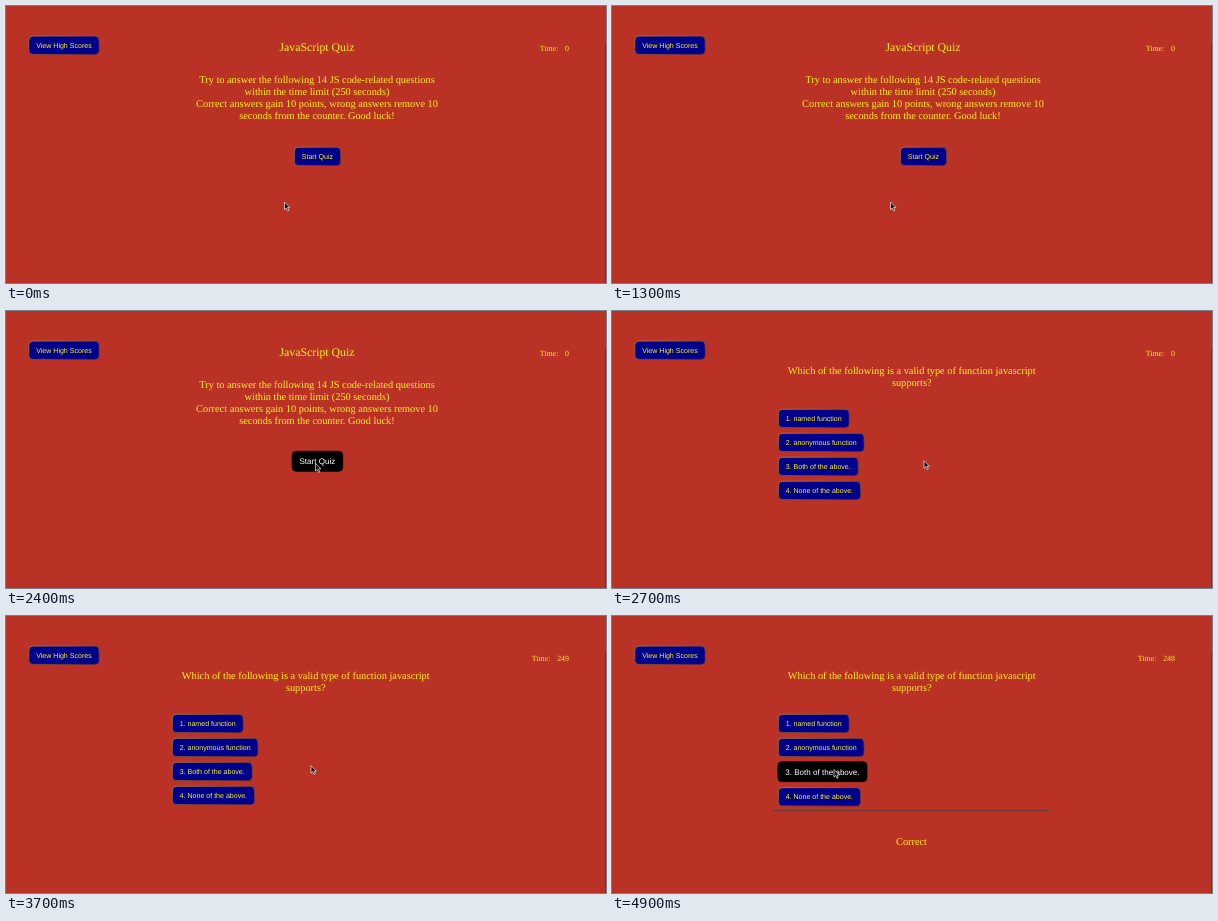
Animation, 600 px wide and 277 px high, one loop 5 s. Source, as an HTML page:

```html
<!DOCTYPE html>
<html lang="en">
<head>
<meta charset="utf-8">
<title>JavaScript Quiz</title>
<style>
  html, body { margin: 0; width: 100%; height: 100%; overflow: hidden; background: #ba3126; }
  svg { display: block; width: 600px; height: 277px; }
  text { fill: #fdf41e; text-rendering: geometricPrecision; }
  .serif { font: 10.34px "Liberation Serif", Times, serif; text-anchor: middle; }
  #title { font-size: 11.8px; }
  #time text { font-size: 7.9px; text-anchor: end; }
  .btn text { font: 7.05px "Liberation Sans", Arial, sans-serif; }
  .btn rect { fill: #00008b; stroke: url(#bevel); stroke-width: .8px; }
  .btn.hover text { font-size: 8.05px; fill: #fff; }
  .btn.hover rect { fill: #000; stroke: #000; }
</style>
</head>
<body>
<svg viewBox="0 0 600 277">
  <defs>
    <linearGradient id="bevel" x2="1" y2="1">
      <stop offset="0" stop-color="#b98a34"/>
      <stop offset="1" stop-color="#4a2436"/>
    </linearGradient>
  </defs>
  <rect width="600" height="277" fill="#ba3126"/>
  <rect x="599" y="37" width="1" height="240" fill="#8e261f"/>
  <g id="common"></g>
  <g id="time" class="serif">
    <text id="label" y="44.7">Time:</text>
    <text id="count" x="563" y="44.7"></text>
  </g>
  <g id="intro">
    <g class="serif">
      <text id="title" x="311" y="45">JavaScript Quiz</text>
      <text x="311" y="76.7">Try to answer the following 14 JS code-related questions</text>
      <text x="311" y="88.9">within the time limit (250 seconds)</text>
      <text x="311" y="101.1">Correct answers gain 10 points, wrong answers remove 10</text>
      <text x="311" y="113.3">seconds from the counter. Good luck!</text>
    </g>
  </g>
  <g id="quiz">
    <g class="serif">
      <text x="299.7" y="63">Which of the following is a valid type of function javascript</text>
      <text x="299.7" y="75.3">supports?</text>
    </g>
  </g>
  <g id="result" class="serif">
    <path d="M161 194.5H438" stroke="#693c38"/>
    <text x="299.5" y="229">Correct</text>
  </g>
  <path id="cursor" d="M0 0V7.6L1.7 6L3 8.9L4.3 8.3L3.1 5.5H5.4Z" fill="#111" stroke="#eee" stroke-width=".7" stroke-linejoin="round"/>
</svg>
<script>
const LOOP = 5000, STEP = 100;
const START = 2500, ANSWER = 4700;
const $ = id => document.getElementById(id);

// time, x, y of the pointer tip
const path = [
  [0, 278.5, 196], [1300, 278.5, 196], [1900, 277.3, 176.3],
  [2300, 309, 153], [2700, 312, 149.6], [3300, 311, 149.6],
  [3700, 305, 149.6], [4300, 221, 172.5], [4600, 222, 155],
  [4900, 222, 153.5], [5000, 222, 153.5]
];

function pointer(t) {
  const i = Math.max(1, path.findIndex(p => p[0] >= t));
  const [t0, x0, y0] = path[i - 1], [t1, x1, y1] = path[i];
  const k = (t - t0) / (t1 - t0), e = k * k * (3 - 2 * k);
  return [x0 + (x1 - x0) * e, y0 + (y1 - y0) * e];
}

function button(parent, label, x, y, centered) {
  const make = (tag, to) => to.appendChild(document.createElementNS("http://www.w3.org/2000/svg", tag));
  const g = make("g", $(parent)), rect = make("rect", g), text = make("text", g);
  text.textContent = label;
  const b = { g, rect, text, x, y, centered };
  layout(b, false, 0);
  return b;
}

function layout(b, hover, dy) {
  b.g.setAttribute("class", hover ? "btn hover" : "btn");
  const w = b.text.getComputedTextLength() + 14.8, h = hover ? 20 : 18.3;
  const x = b.centered ? b.x - w / 2 : b.x - (hover ? .4 : 0);
  const y = b.y + dy;
  const set = { x, y: y - h / 2, width: w, height: h, rx: 4 };
  for (const k in set) b.rect.setAttribute(k, set[k]);
  b.text.setAttribute("x", x + 7.4);
  b.text.setAttribute("y", y + (hover ? 2.8 : 2.5));
  b.box = set;
}

function inside(b, [px, py]) {
  const { x, y, width, height } = b.box;
  return px > x && px < x + width && py > y && py < y + height;
}

button("common", "View High Scores", 22.8, 39.2);
const start = button("intro", "Start Quiz", 311.4, 150.3, true);
const answers = ["named function", "anonymous function", "Both of the above.", "None of the above."]
  .map((s, i) => button("quiz", `${i + 1}. ${s}`, 166.3, 107.4 + 24 * i));

const show = (id, on) => $(id).setAttribute("visibility", on ? "visible" : "hidden");

function draw(t) {
  const playing = t >= START, tip = pointer(t);
  show("intro", !playing);
  show("quiz", playing);
  show("result", t >= ANSWER);

  const left = t < START + 1000 ? 0 : 250 - Math.floor((t - START) / 1000);
  $("count").textContent = left;
  $("label").setAttribute("x", 556.2 - $("count").getComputedTextLength());

  layout(start, false, 0);
  layout(start, !playing && inside(start, tip), 0);

  // an enlarged answer pushes the ones below it down
  let dy = 0;
  for (const b of answers) {
    layout(b, false, dy);
    if (playing && inside(b, tip)) {
      layout(b, true, dy + .3);
      dy += 1.4;
    }
  }
  $("cursor").setAttribute("transform", `translate(${tip})`);
}

function tick() {
  const t = performance.now() % LOOP;
  draw(Math.floor(t / STEP) * STEP);
  requestAnimationFrame(tick);
}
tick();
</script>
</body>
</html>
```
